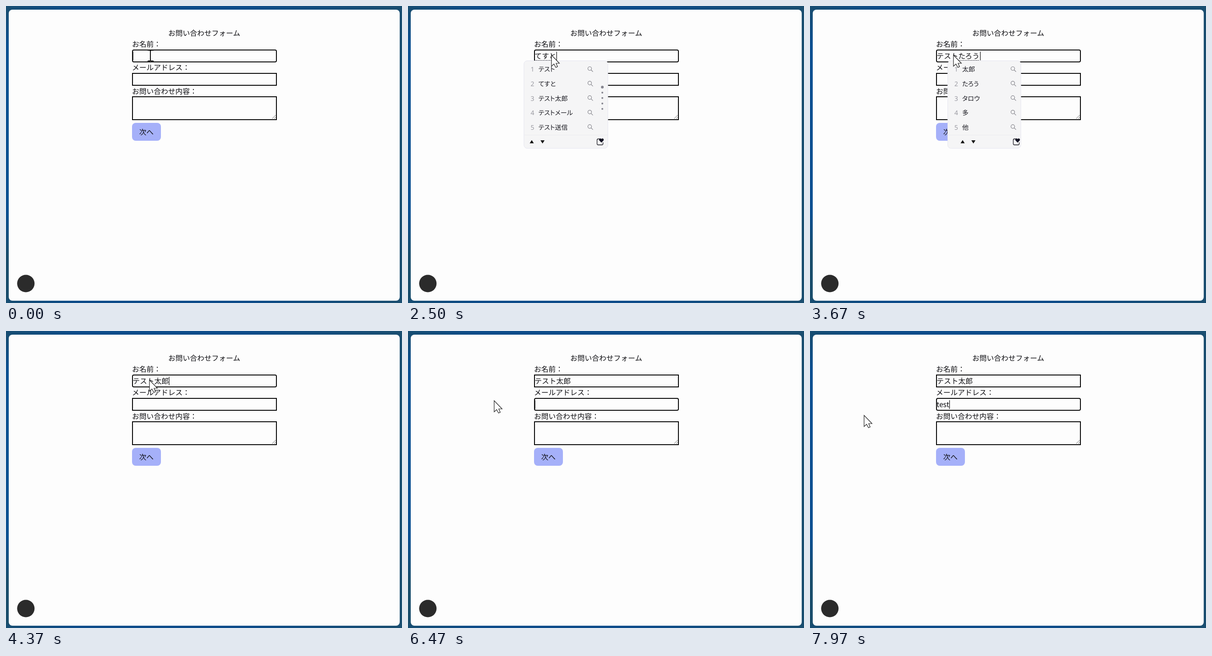
Recreate the animation shown at these times as an HTML page. Size 864 px wide and 648 px high, loop 8000 ms.

```html
<!DOCTYPE html>
<html lang="ja">
<head>
<meta charset="utf-8">
<title>お問い合わせフォーム</title>
<style>
html, body { margin: 0; width: 100%; height: 100%; overflow: hidden; background: #114e84; }
svg { display: block; width: 864px; height: 648px; }
text { font: 15.75px "Noto Sans CJK JP", "Noto Sans CJK", sans-serif; fill: #0c0c10; white-space: pre; text-rendering: geometricPrecision; }
.box { fill: none; stroke: #0a0a0a; stroke-width: 2; }
.list text { font: 14px "Noto Sans", "Noto Sans CJK JP", sans-serif; font-feature-settings: "palt"; fill: #1b1b22; }
.list text.num { fill: #9a9aa2; }
.icon { fill: none; stroke: #85858c; stroke-width: 1.2; }
</style>
</head>
<body>
<svg viewBox="0 0 864 648">
  <defs>
    <linearGradient id="across">
      <stop offset="0" stop-color="#174d72"/><stop offset=".18" stop-color="#0d4c8a"/>
      <stop offset=".6" stop-color="#0d4c8a"/><stop offset="1" stop-color="#1a4e70"/>
    </linearGradient>
    <linearGradient id="down" x2="0" y2="1">
      <stop offset="0" stop-color="#174d72"/><stop offset=".12" stop-color="#0d5092"/>
      <stop offset=".7" stop-color="#0d5092"/><stop offset=".85" stop-color="#1a4e6c"/>
    </linearGradient>
  </defs>
  <rect width="864" height="648" fill="url(#across)"/>
  <rect y="8" width="8" height="632" fill="url(#down)"/>
  <rect x="6" y="8" width="853" height="635" rx="8" fill="#fdfdfd"/>

  <text x="354" y="65">お問い合わせフォーム</text>
  <text x="275" y="88.7">お名前：</text>
  <text x="275" y="140">メールアドレス：</text>
  <text x="275" y="191.7">お問い合わせ内容：</text>
  <rect id="nameBox" class="box" x="276" y="96" width="314" height="26"/>
  <rect id="mailBox" class="box" x="276" y="147" width="314" height="26"/>
  <rect class="box" x="276" y="198" width="314" height="50"/>
  <path d="M580.5 246l8-8M585 246l3.5-3.5" stroke="#666" fill="none"/>
  <rect x="275" y="255" width="63" height="39" rx="8" fill="#a5b0f9"/>
  <text x="290.5" y="280.5">次へ</text>
  <circle cx="43.3" cy="605.5" r="19" fill="#2b2b2b"/>

  <text id="nameText" x="276.2" y="114.7"></text>
  <text id="mailText" x="276.2" y="166"></text>
  <path id="underline" stroke="#222" stroke-dasharray="2 1.5" fill="none"/>
  <rect id="caret" width="1.2" height="19" fill="#111"/>
  <g id="list" class="list"></g>
  <path id="arrow" d="M0 0V24.5L5.5 19.5L9.5 27L13.3 25.4L10 18H17.3Z" fill="#fff" stroke="#222" stroke-width="1.2"/>
  <path id="beam" d="M-6-11.5h4.5L0-10L1.5-11.5H7M0-10V10.5M-6 12h4.5L0 10.5L1.5 12H7" fill="none" stroke="#111" stroke-width="2"/>
</svg>
<script>
const LOOP = 8000, EM = 15.75, LEFT = 276.5;
const MAIL_FOCUS = 5400;
const $ = id => document.getElementById(id);

// [time, settled text, text being composed, list name]
const nameSteps = [
  [0, "", "", ""],
  [1500, "", "ｔ", ""],
  [1620, "", "て", ""],
  [1760, "", "てｓ", "te"],
  [1900, "", "てす", "te"],
  [2060, "", "てすｔ", "te"],
  [2180, "", "てすと", "test"],
  [2680, "", "テスト", ""],
  [2900, "テスト", "", ""],
  [3040, "テスト", "ｔ", "t"],
  [3200, "テスト", "た", "taro"],
  [3340, "テスト", "たｒ", "taro"],
  [3460, "テスト", "たろ", "taro"],
  [3600, "テスト", "たろう", "taro"],
  [3860, "テスト", "太郎", ""],
  [4150, "テスト太郎", "", ""]
];
const mailSteps = [
  [MAIL_FOCUS, ""], [7280, "t"], [7420, "te"], [7600, "tes"], [7800, "test"]
];
const wide = { x: 253, w: 183, arrows: 17, icon: 38, heart: 17, dots: true };
const slim = { x: 300.5, w: 159.5, arrows: 32.5, icon: 16, heart: 10 };
const lists = {
  te: { ...wide, items: ["テスト", "です", "テスト送信", "テストメール", "手"] },
  test: { ...wide, items: ["テスト", "てすと", "テスト太郎", "テストメール", "テスト送信"] },
  t: { ...slim, items: ["t", "tp", " t", "type", "true"] },
  taro: { ...slim, items: ["太郎", "たろう", "タロウ", "多", "他"] }
};
// [time, x, y]
const pointerPath = [
  [5100, 313, 107], [5500, 262, 124], [5830, 207, 146], [6420, 188, 152],
  [6480, 188, 152], [6680, 120, 180], [6900, 116, 184], [7150, 118, 184]
];

const stepAt = (steps, t) => steps.findLast(s => s[0] <= t) || steps[0];

function pointerAt(t) {
  const next = pointerPath.findIndex(p => p[0] > t);
  if (next === 0) return pointerPath[0].slice(1);
  if (next < 0) return pointerPath.at(-1).slice(1);
  const a = pointerPath[next - 1], b = pointerPath[next];
  const u = (t - a[0]) / (b[0] - a[0]), k = u * u * (3 - 2 * u);
  return [1, 2].map(i => a[i] + (b[i] - a[i]) * k);
}

function listMarkup({ x, w, arrows, icon, heart, dots, items }) {
  const right = x + w, a = x + arrows, h = right - heart, s = right - icon;
  const rows = items.map((item, i) => {
    const y = 138 + i * 31.6;
    return `<text class="num" x="${x + 14.5}" y="${y + 5.3}">${i + 1}</text>
      <text x="${x + 31.5}" y="${y + 5.3}">${item}</text>
      <path class="icon" d="M${s + 1.5} ${y + 1.5}l4 4M${s + 2.5} ${y - 1.5}a4 4 0 1 0-8 0a4 4 0 1 0 8 0"/>`;
  }).join("");
  const scroll = dots ? [0, 1, 2, 3, 4].map(i =>
    `<circle cx="${right - 12}" cy="${177 + i * 11.9}" r="${i ? 2 : 3}" fill="#85858f"/>`).join("") : "";
  return `<rect x="${x}" y="119.5" width="${w}" height="191" rx="7" fill="#f5f5f6" stroke="#e6e6f0"/>
    <path d="M${x} 281.5h${w}" stroke="#ececef"/>
    ${rows}${scroll}
    <path d="M${a - 4.5} 299.5h9l-4.5-7zM${a + 19} 293h9l-4.5 7z" fill="#111"/>
    <path d="M${h} 290h-4q-2.5 0-2.5 2.5v8q0 2.5 2.5 2.5h8q2.5 0 2.5-2.5v-3" fill="none" stroke="#1a1a22" stroke-width="1.3"/>
    <path d="M${h + 3} 298l-4.5-4.5c-2-3 2-6.5 4.5-3.2c2.5-3.3 6.5.2 4.5 3.2z" fill="#111122"/>`;
}

let shownList = "";
function showList(name) {
  if (name === shownList) return;
  shownList = name;
  $("list").innerHTML = name ? listMarkup(lists[name]) : "";
}

function setText(id, value) {
  if ($(id).textContent !== value) $(id).textContent = value;
}

function render(t) {
  const [nameTime, settled, composing, list] = stepAt(nameSteps, t);
  const [mailTime, mail] = stepAt(mailSteps, t);
  const onMail = t >= MAIL_FOCUS;

  setText("nameText", settled + composing);
  setText("mailText", mail);
  showList(list);
  $("nameBox").setAttribute("rx", onMail ? 0 : 3);
  $("mailBox").setAttribute("rx", onMail ? 3 : 0);

  const from = LEFT + settled.length * EM;
  const to = from + composing.length * EM;
  $("underline").setAttribute("d", composing ? `M${from} 118.5H${to - 1.5}` : "");

  const mailWidth = mail ? $("mailText").getComputedTextLength() : 0;
  $("caret").setAttribute("x", onMail ? LEFT + mailWidth : to);
  $("caret").setAttribute("y", onMail ? 151 : 99.5);
  const idle = t - (onMail ? mailTime : nameTime);
  $("caret").style.display = idle % 1000 < 500 ? "" : "none";

  const [x, y] = pointerAt(t);
  const moving = t > pointerPath[0][0];
  const overField = x > 275 && y < 123;
  const isBeam = t < 1760 || moving && overField;
  $("beam").style.display = isBeam ? "" : "none";
  $("arrow").style.display = isBeam ? "none" : "";
  $("beam").setAttribute("transform", `translate(${x + 2} ${y + 1})`);
  $("arrow").setAttribute("transform", `translate(${x} ${y})`);
}

const start = performance.now();
function tick() {
  render((performance.now() - start) % LOOP);
  requestAnimationFrame(tick);
}
tick();
</script>
</body>
</html>
```
